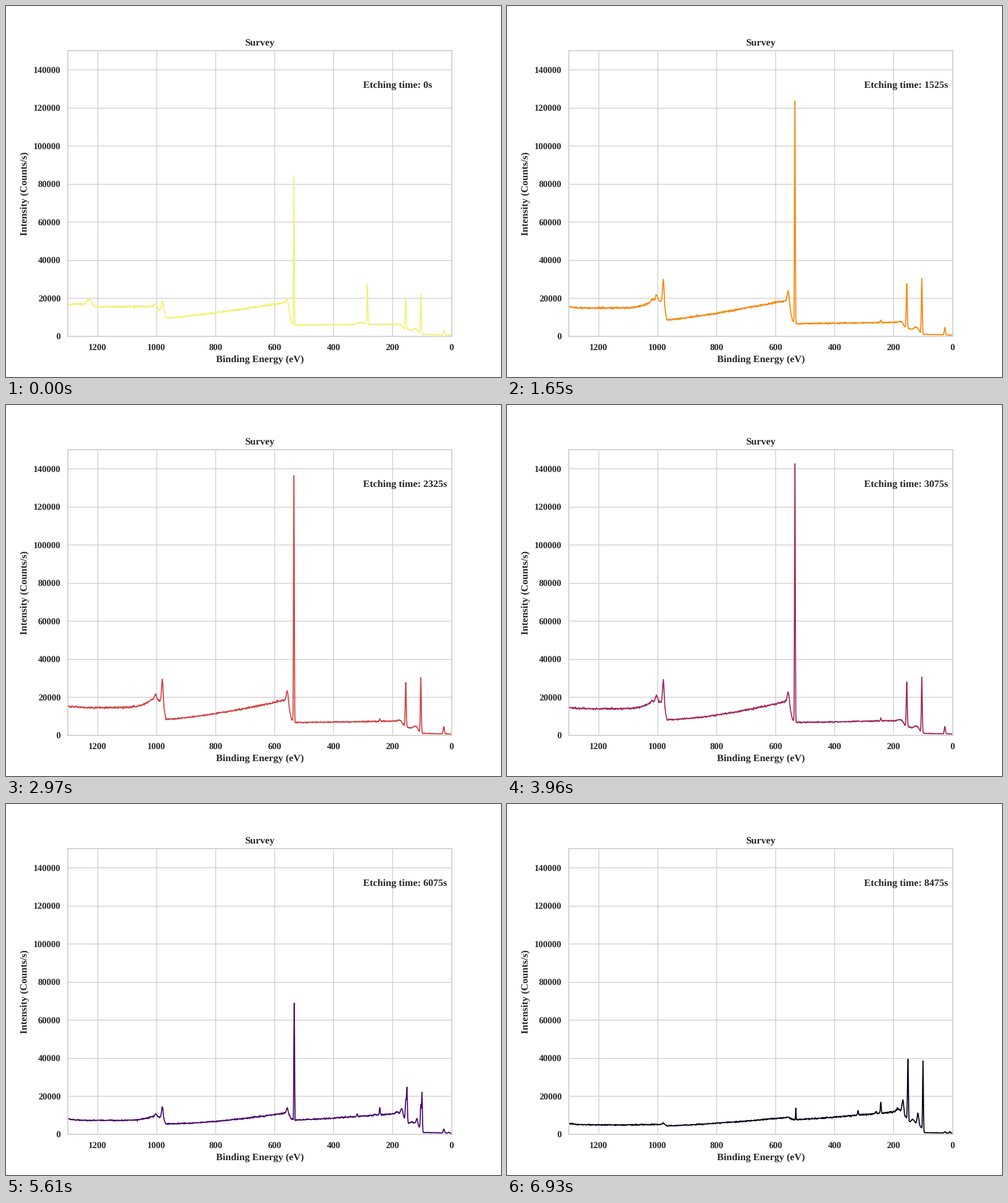
Animation, 865 px wide and 648 px high, one loop 7.26 s. Source, as a matplotlib script:

```python
import numpy as np
import matplotlib.pyplot as plt
from matplotlib.animation import FuncAnimation

WIDTH, HEIGHT, DPI = 865, 648, 64
PT = 72 / DPI  # points per pixel
INK, GRID = "#262626", "#cccccc"

plt.rcParams.update({
    "font.family": "Liberation Serif", "font.weight": "bold",
    "text.color": INK, "text.hinting": "none", "text.hinting_factor": 8,
})

ETCH = np.cumsum([0, 325] + [300] * 4 + [200] * 4 + [250] * 3 + [300] * 2
                 + [600, 1200] + [600] * 5)
FRAMES = len(ETCH)
ENERGY = np.arange(1298, 1, -1)

# Each layer: background levels at the edges and (energy, width, height)
# peaks on top, all in hundreds of counts.
EDGES = np.array([1300, 978, 968, 558, 542, 530, 172, 161, 150, 118, 108, 98, 0])
SURFACE = np.array([154, 160, 95, 178, 65, 59, 63, 38, 38, 40, 13, 10, 6])
OXIDE = np.array([150, 158, 86, 192, 83, 66, 72, 48, 40, 42, 16, 10, 6])
SILICON = np.array([46, 48, 43, 85, 79, 77, 122, 98, 66, 60, 40, 8, 6])

SURFACE_PEAKS = [(1265, 22, 14), (1228, 8, 38), (1003, 5, 12), (990, 5, -22),
                 (980, 2.5, 28), (556, 4, 27), (305, 12, 12), (285, 1.4, 210),
                 (155, 1.6, 158), (135, 6, -6), (104, 1.5, 208), (26, 2, 26)]
OXIDE_PEAKS = [(1018, 4, 10), (1003, 4, 33), (980, 2.5, 118), (556, 3.5, 55),
               (243, 1.4, 13), (178, 4, 5), (155, 1.6, 232), (135, 6, -5),
               (126, 5, 6), (104, 1.5, 288), (26, 2, 38)]
SILICON_PEAKS = [(980, 4, 5), (320, 1.6, 25), (260, 3, 9), (243, 1.4, 62),
                 (185, 5, 14), (168, 3, 65), (151, 1.5, 335), (135, 4, 18),
                 (117, 2.5, 55), (100, 1.3, 372), (26, 2, 6), (9, 1.5, 9)]

OXYGEN_TIMES = [0, 325, 1525, 2325, 3075, 3675, 4275, 6075, 8475]
OXYGEN_HEIGHTS = [838, 1130, 1235, 1363, 1425, 1425, 1225, 688, 137]


def logistic(x):
    return 1 / (1 + np.exp(-x))


def bell(center, width, height):
    return height * np.exp(-0.5 * ((ENERGY - center) / width) ** 2)


def bells(peaks):
    return sum(bell(*peak) for peak in peaks)


def background(levels, slope_power):
    """Join the edge levels, bending the three long spans."""
    power = np.ones(len(EDGES) - 1)
    power[[0, 2, 5]] = 4, slope_power, 1.2
    i = np.searchsorted(-EDGES, -ENERGY, side="right") - 1
    u = (EDGES[i] - ENERGY) / (EDGES[i] - EDGES[i + 1])
    return levels[i] + (levels[i + 1] - levels[i]) * u ** power[i]


def spectrum(frame):
    time = ETCH[frame]
    dirt = np.exp(-time / 250)
    deep = logistic((time - 5050) / 950)   # substrate share of the background
    bare = logistic((time - 6000) / 600)   # substrate share of the peaks

    def mix(surface, oxide, silicon, share):
        return dirt * surface + (1 - dirt) * ((1 - share) * oxide + share * silicon)

    slope_power = np.interp(time, [1525, 4275, 8475], [1.2, 1.85, 1.3])
    counts = background(mix(SURFACE, OXIDE, SILICON, deep), slope_power)
    counts += 8 * np.exp((ENERGY - 1300) / 25)
    auger_tail = bell(1003, 33, 32) * np.clip((ENERGY - 968) / 10, 0, 1)
    counts += mix(bells(SURFACE_PEAKS), bells(OXIDE_PEAKS) + auger_tail,
                  bells(SILICON_PEAKS), bare)
    oxygen = bell(round(534 - 2.6 * bare), 1.35,
                  np.interp(time, OXYGEN_TIMES, OXYGEN_HEIGHTS))

    rng = np.random.default_rng(40 + frame)
    noise = 0.2 * np.sqrt(np.clip(counts, 1, 200)) * rng.standard_normal(ENERGY.size)
    return 100 * np.maximum(np.maximum(counts + noise, oxygen), 1)


fig = plt.figure(figsize=(WIDTH / DPI, HEIGHT / DPI), dpi=DPI, facecolor="white")
ax = fig.add_axes([0.125, 0.11, 0.775, 0.77])
ax.set(xlim=(1300, 0), ylim=(0, 150000),
       xticks=range(0, 1201, 200), yticks=range(0, 140001, 20000))
ax.set_axisbelow(True)
ax.grid(color=GRID, linewidth=1.35 * PT)
ax.tick_params(length=0, pad=12.6 * PT, labelsize=15.84 * PT, labelcolor=INK)
for spine in ax.spines.values():
    spine.set(color=GRID, linewidth=1.7 * PT)


def caption(x, y, text, **kwargs):
    return fig.text(x / WIDTH, 1 - y / HEIGHT, text, fontsize=17.35 * PT,
                    va="baseline", rotation_mode="anchor", **kwargs)


caption(443.3, 68.3, "Survey", ha="center")
caption(443.3, 622, "Binding Energy (eV)", ha="center")
caption(37.7, 327.5, "Intensity (Counts/s)", ha="center", rotation=90)
etch_label = caption(623.8, 143.2, "", ha="left")

line, = ax.plot([], [], linewidth=1.9 * PT, solid_joinstyle="round")
inferno = plt.get_cmap("inferno")


def update(frame):
    line.set_data(ENERGY, spectrum(frame))
    line.set_color(inferno(1 - (frame + 1) / (FRAMES + 1)))
    etch_label.set_text(f"Etching time: {ETCH[frame]}s")
    return line, etch_label


anim = FuncAnimation(fig, update, frames=FRAMES, init_func=lambda: update(0),
                     interval=330, repeat=True, repeat_delay=0)
plt.show()
```
